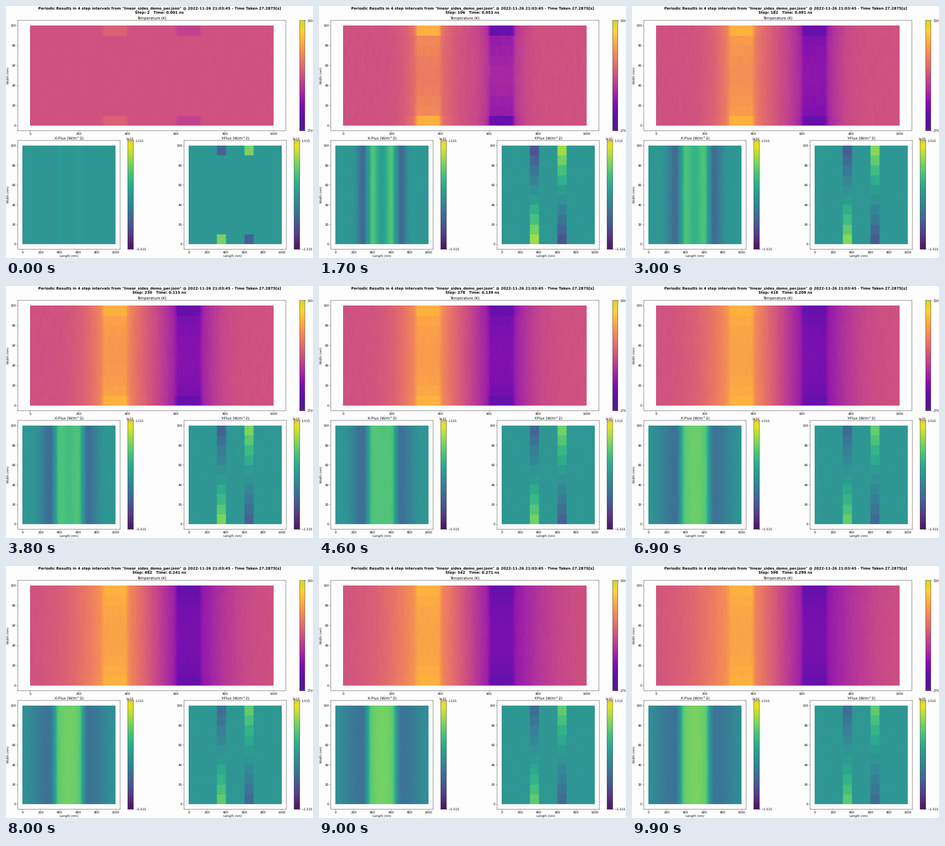
These frames come from a looping animation (600x491 px, 10000 ms). A matplotlib script:

```python
import math

import matplotlib as mpl
import matplotlib.pyplot as plt
import numpy as np
from matplotlib.animation import FuncAnimation
from matplotlib.colors import ListedColormap

W, H, DPI = 600, 491, 100
K = 0.428  # scale from default matplotlib sizes
FRAMES, INTERVAL = 100, 100
NX, NY = 200, 10
HOT, COLD = (300, 400), (600, 700)
PAPER = "#fdfdfd"

plt.rcParams.update({
    "font.family": "DejaVu Sans", "font.size": 10 * K,
    "text.hinting": "none",
    "axes.facecolor": PAPER,
    "axes.titlesize": 12 * K, "axes.titlepad": 2.0,
    "axes.linewidth": 0.8 * K,
    "xtick.major.width": 0.8 * K, "ytick.major.width": 0.8 * K,
    "xtick.major.size": 3.5 * K, "ytick.major.size": 3.5 * K,
    "xtick.major.pad": 1.1, "ytick.major.pad": 1.2,
})

fig = plt.figure(figsize=(W / DPI, H / DPI), dpi=DPI, facecolor=PAPER)


def soft_cmap(name, low, high, n_low, n_high):
    """Slightly washed colormap with muted ends."""
    c = mpl.colormaps[name](np.linspace(0, 1, 256))[:, :3]
    c = 0.94 * c + 0.06
    for end, n, part in ((low, n_low, slice(0, n_low)),
                         (high, n_high, slice(256 - n_high, 256))):
        mix = np.linspace(1, 0, n)[:, None] ** 0.5
        if part.start:
            mix = mix[::-1]
        c[part] = c[part] * (1 - mix) + np.array(end) / 255 * mix
    return ListedColormap(c)


PLASMA = soft_cmap("plasma", (90, 24, 148), (222, 209, 42), 36, 24)
VIRIDIS = soft_cmap("viridis", (74, 32, 98), (228, 206, 44), 12, 12)


def axes_px(x0, y0, x1, y1):
    return fig.add_axes([x0 / W, 1 - y1 / H, (x1 - x0) / W, (y1 - y0) / H])


def text_px(x, y, s, **kw):
    kw = {"ha": "center", "va": "center", **kw}
    return fig.text(x / W, 1 - y / H, s, **kw)


def field(box, title, cmap):
    ax = axes_px(*box)
    mesh = ax.pcolormesh(np.linspace(0, 1000, NX + 1),
                         np.linspace(0, 100, NY + 1),
                         np.full((NY, NX), 0.5), cmap=cmap, vmin=0, vmax=1)
    ax.set(xlim=(-50, 1050), ylim=(-5, 105), title=title,
           xticks=range(0, 1001, 200), yticks=range(0, 101, 20))
    return mesh


def bar(box, cmap, low, high):
    ax = axes_px(*box)
    ax.pcolormesh([0, 1], np.linspace(0, 1, 257),
                  np.linspace(0, 1, 256)[:, None], cmap=cmap)
    ax.set(xlim=(0, 1), ylim=(0, 1), xticks=[])
    ax.yaxis.tick_right()
    ax.set_yticks([0, 1], [low, high])


temp = field((23.2, 28.25, 546.8, 242.75), "Temperature (K)", PLASMA)
xflux = field((22.9, 262.4, 223.1, 473.6), "X-Flux (W/m^2)", VIRIDIS)
yflux = field((347.9, 262.4, 548.1, 473.6), "Y-Flux (W/m^2)", VIRIDIS)
bar((573.5, 28.2, 584.4, 242.8), PLASMA, "270", "330")
for right in (248.8, 573.6):
    bar((right - 10.6, 262.4, right, 473.6), VIRIDIS, "\u22121.515", "1.515")
    text_px(right + 0.4, 260.5, "1e10", ha="right", va="baseline")
for y in (136, 368):
    text_px(4.6, y, "Width (nm)", rotation=90)
for x in (123, 443):
    text_px(x, 486.8, "Length (nm)")
head = text_px(300, 8.6, "", weight="bold", size=12 * K)

X = (np.arange(NX) + 0.5) * 1000 / NX
DEPTH = np.minimum(np.arange(NY), NY - 1 - np.arange(NY))
SIDE = np.where(np.arange(NY) < NY / 2, 1, -1)
# Per row, counted from the nearest wall
LAG = np.array([0.9, 1.03, 1.1, 1.25, 1.35])
LEVEL = np.array([1, 0.95, 0.9, 0.88, 0.87])
FALL = np.array([1, 0.78, 0.53, 0.33, 0.08])
erfc = np.vectorize(math.erfc)


def pad_mask(pad, soft):
    return 1 / (1 + np.exp(-(50 - np.abs(X - sum(pad) / 2)) / soft))


def pad_dist(pad):
    return np.maximum(np.abs(X - sum(pad) / 2) - 50, 0)


def temperature(t):
    tau = np.array([0.01, 0.05, 0.05, 0.05, 0.05])
    heat = 0.315 * LEVEL * np.maximum(1 - LAG * np.exp(-t / tau), 0)
    spread = 40 + 600 * t
    jump = 0.65 + 0.2 * (1 - math.exp(-t / 0.1))
    rows = heat[DEPTH][:, None]
    outer = (0.25 * rows + 0.75 * heat[4]) * jump * min(t / 0.02, 1)
    tail = erfc(pad_dist(HOT) / spread) - erfc(pad_dist(COLD) / spread)
    hot, cold = pad_mask(HOT, 2.5), pad_mask(COLD, 2.5)
    inside = hot + cold
    return 0.5 + outer * tail * (1 - inside) + rows * (hot - 1.06 * cold)


def flux_x(t):
    amp = (0.16 + 0.09 * math.exp(-t / 0.1)) * (1 - math.exp(-t / 0.015))
    reach, inner = 20 + 800 * t, 26 + 50 * t

    def edge(x0, direction):
        d = (X - x0) * direction
        return np.where(d > 0, np.exp(-(d / reach) ** 2),
                        np.exp(-np.abs(d / inner) ** 2.7))

    gap = edge(HOT[1], 1) * (X < COLD[1]) + edge(COLD[0], -1) * (X > HOT[0])
    rim = edge(HOT[0], -1) + edge(COLD[1], 1)
    return 0.5 + np.tile(amp * (gap - 0.95 * rim), (NY, 1))


def flux_y(t):
    amp = 0.2 + 0.2 * math.exp(-t / 0.1)
    amp *= 1 - 0.45 * math.exp(-t / 0.004)
    front = np.clip(200 * t - np.arange(5) + 0.5, 0, 1)
    front[0] = 1
    rows = (amp * FALL * front)[DEPTH] * SIDE
    v = rows[:, None] * (pad_mask(HOT, 2) - pad_mask(COLD, 2))
    return 0.5 + v * np.where(v > 0, 1.1, 0.87)


def draw(i):
    step = 4 * ((3 * i + 1) // 2) + 2
    t = step * 0.0005
    rng = np.random.default_rng(step)
    grain = 0.004 * min(t / 0.03, 1)
    for mesh, f in ((temp, temperature), (xflux, flux_x), (yflux, flux_y)):
        mesh.set_array(f(t) + rng.normal(0, grain, (NY, NX)))
    head.set_text('Periodic Results in 4 step intervals from '
                  '"linear_sides_demo_per.json" @ 2022-11-26 21:03:45 - '
                  f'Time Taken 27.2875[s]\nStep: {step}   Time: {t:.3f} ns')
    return temp, xflux, yflux, head


anim = FuncAnimation(fig, draw, frames=FRAMES, interval=INTERVAL,
                     repeat=True, repeat_delay=0, blit=False)
plt.show()
```
